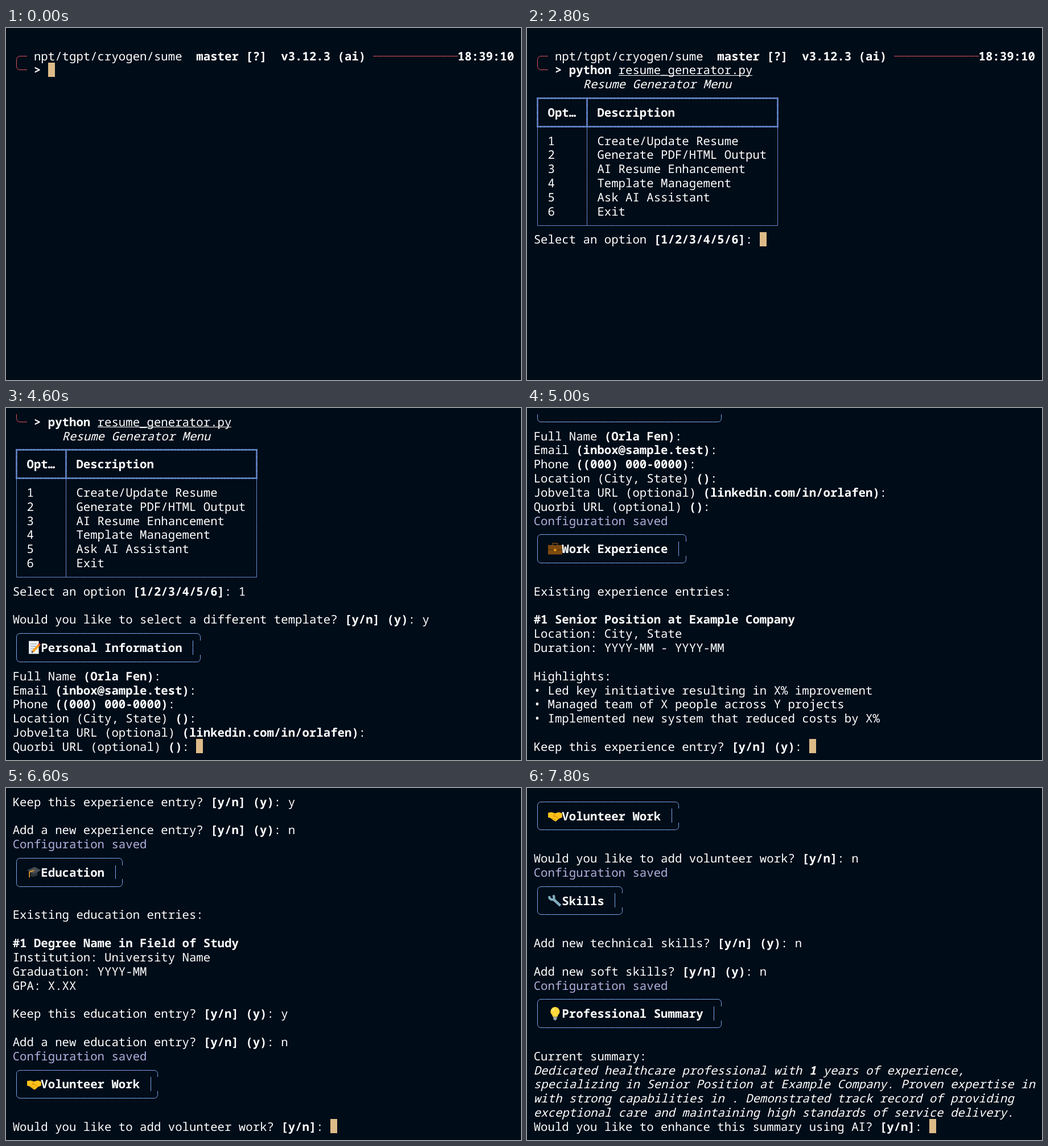
These frames come from a looping animation (905x619 px, 8 s). An HTML page with a canvas:

```html
<!DOCTYPE html>
<html lang="en">
<head>
<meta charset="utf-8">
<title>Resume Generator</title>
<style>
  html, body { margin: 0; width: 100%; height: 100%; overflow: hidden; background: #000c18; }
  canvas { display: block; }
</style>
</head>
<body>
<canvas id="screen" width="905" height="619"></canvas>
<script>
const ctx = document.getElementById('screen').getContext('2d');
const LEFT = 11.7, TOP = 11.4, CELL_W = 12.41, CELL_H = 24.83, ROWS = 24;
const STEP = 200, LOOP = 8000;
const BACK = '#000c18', INK = '#ffffff', CURSOR = '#ddbb88';
const RED = '#dd5560', TABLE = '#6688cc', PANEL = '#7aa6ee', SAVED = '#b0b0dd';

// Markup: * bold, ~ italic, | underline, $ cursor position (an answer may follow it).
// A leading ! means the program pauses on an empty line first.
const lines = [];
const add = (text, accent = INK, ink = INK) =>
  lines.push({ text: text.replace(/^!/, ''), pause: text[0] === '!', accent, ink });
const addAll = (block, accent) => block.split('\n').forEach(text => add(text, accent));
const saved = (mark = '') => add(mark + 'Configuration saved', INK, SAVED);
const panel = (icon, title) => {
  const bar = '─'.repeat(title.length + 5);
  addAll(`╭${bar}╮\n│ ${icon}*${title}* │\n╰${bar}╯`, PANEL);
};

addAll(`
╭─ npt/tgpt/cryogen/sume  *master [?]  v3.12.3 (ai)* ${'─'.repeat(12)}*18:39:10*
╰─ *> python* |resume_generator.py|`, RED);
add('!       ~Resume Generator Menu~');
const fill = (l, bar, m, r) => l + bar.repeat(6) + m + bar.repeat(26) + r;
const row = (bar, id, label, style = '') =>
  `${bar} ${style}${id.padEnd(4)}${style} ${bar} ${style}${label.padEnd(24)}${style} ${bar}`;
add(fill('┏', '━', '┳', '┓'), TABLE);
add(row('┃', 'Opt…', 'Description', '*'), TABLE);
add(fill('┡', '━', '╇', '┩'), TABLE);
['Create/Update Resume', 'Generate PDF/HTML Output', 'AI Resume Enhancement',
 'Template Management', 'Ask AI Assistant', 'Exit']
  .forEach((label, i) => add(row('│', String(i + 1), label), TABLE));
add(fill('└', '─', '┴', '┘'), TABLE);
addAll(`Select an option *[1/2/3/4/5/6]*: $1

Would you like to select a different template? *[y/n]* *(y)*: $y`);
panel('📝', 'Personal Information');
addAll(`Full Name *(Orla Fen)*: $
Email *(inbox@sample.test)*: $
Phone *((000) 000-0000)*: $
Location (City, State) *()*: $
Jobvelta URL (optional) *(linkedin.com/in/orlafen)*: $
Quorbi URL (optional) *()*: $`);
saved('!');
panel('💼', 'Work Experience');
addAll(`
Existing experience entries:

*#1 Senior Position at Example Company*
Location: City, State
Duration: YYYY-MM - YYYY-MM

Highlights:
• Led key initiative resulting in X% improvement
• Managed team of X people across Y projects
• Implemented new system that reduced costs by X%

Keep this experience entry? *[y/n]* *(y)*: $y

Add a new experience entry? *[y/n]* *(y)*: $n`);
saved();
panel('🎓', 'Education');
addAll(`
Existing education entries:

*#1 Degree Name in Field of Study*
Institution: University Name
Graduation: YYYY-MM
GPA: X.XX

Keep this education entry? *[y/n]* *(y)*: $y

Add a new education entry? *[y/n]* *(y)*: $n`);
saved();
panel('🤝', 'Volunteer Work');
addAll(`
Would you like to add volunteer work? *[y/n]*: $n`);
saved();
panel('🔧', 'Skills');
addAll(`
Add new technical skills? *[y/n]* *(y)*: $n

Add new soft skills? *[y/n]* *(y)*: $n`);
saved();
panel('💡', 'Professional Summary');
addAll(`
Current summary:
~Dedicated healthcare professional with *1* years of experience,~
~specializing in Senior Position at Example Company. Proven expertise in~
~with strong capabilities in . Demonstrated track record of providing~
~exceptional care and maintaining high standards of service delivery.~
Would you like to enhance this summary using AI? *[y/n]*: $`);

// One entry per step: the row holding the cursor and that row's text.
const COMMAND_ROW = 2;
const steps = [];
const push = (row, text) => steps.push({ row, text });
const type = text => push(COMMAND_ROW, '╰─ *> ' + text);
type('*$');
for (let n = 1; n <= 6; n++) type(`${'python'.slice(0, n)}*$${'python demo.py'.slice(n)}`);
type('python* $demo.py');
const script = 'resume_generator.py';
for (let n = 1; n <= 4; n++) type(`python* |${script.slice(0, n)}|$${script.slice(n)}`);
type(`python* |${script}|$`);
lines.forEach(({ text, pause }, i) => {
  if (pause) push(i, '$');
  const [prompt, answer] = text.split('$');
  if (answer === undefined) return;
  push(i, prompt + '$');
  if (answer) push(i, prompt + answer + '$');
});

// Stroke weights: up, right, down, left (1 light, 2 heavy).
const strokes = {
  '─': '0101', '│': '1010', '━': '0202', '┃': '2020', '┏': '0220', '┳': '0222', '┓': '0022',
  '┡': '2210', '╇': '2212', '┩': '2012', '└': '1100', '┴': '1101', '┘': '1001'
};
const corners = { '╭': [1, 1], '╮': [-1, 1], '╰': [1, -1], '╯': [-1, -1] };

// Icon layers on a 24 unit square: colour, path, stroke width (filled when absent).
const icons = {
  '📝': [['#f2f5f7', 'M3 1H20V23H3Z'], ['#99aabb', 'M6 6H16M6 10H15M6 14H12M6 18H10', 1.3],
         ['#f7a51d', 'M10 19L20 8', 4], ['#e0453a', 'M20 8L22 6', 4], ['#333333', 'M8 21L10 19', 2]],
  '💼': [['#5d3a12', 'M8 6V3H16V6', 2], ['#7d4a10', 'M0 6H24V22H0Z'],
         ['#4e2c08', 'M0 13Q12 17 24 13', 1.2], ['#f2b01e', 'M10 13H14V16H10Z']],
  '🎓': [['#2f3337', 'M6 12V19Q12 22 18 17V11Z'], ['#484e53', 'M0 9L13 3L24 9L11 15Z'],
         ['#f5a623', 'M12 9L4 12V21', 1.6]],
  '🤝': [['#fcc21b', 'M0 7L6 6L12 8L18 6L24 8V15L19 17L13 22L9 20L4 16L0 15Z'],
         ['#d98f0c', 'M12 9L9 13H13L18 17M7 18L9 16M10 20L12 17', 1.2]],
  '🔧': [['#82aec0', 'M8 9L21 21', 4.5], ['#82aec0', 'M2 5Q2 11 8 11Q12 9 9 3', 4]],
  '💡': [['#ffd83b', 'M12 1A8 8 0 0 1 17 15L16 18H8L7 15A8 8 0 0 1 12 1Z'],
         ['#9aa7ad', 'M9 18H15V22L13 24H11L9 22Z'], ['#fff3b0', 'M8 8Q9 5 11 4', 1.5]]
};

function drawIcon(layers, x, y) {
  ctx.save();
  ctx.translate(x + 0.5, y);
  ctx.scale(1.03, 1.03);
  for (const [color, path, width] of layers) {
    ctx.fillStyle = ctx.strokeStyle = color;
    ctx.lineWidth = width || 1;
    ctx[width ? 'stroke' : 'fill'](new Path2D(path));
  }
  ctx.restore();
}

function drawBox(ch, x, y, color) {
  const x0 = Math.round(x), x1 = Math.round(x + CELL_W);
  const y0 = Math.round(y), y1 = Math.round(y + CELL_H);
  const cx = Math.floor(x + CELL_W / 2 + 0.5) + 0.5, cy = Math.floor(y + 12.9) + 0.5;
  ctx.strokeStyle = color;
  if (corners[ch]) {
    const [dx, dy] = corners[ch], endX = dx > 0 ? x1 : x0;
    ctx.lineWidth = 1;
    ctx.beginPath();
    ctx.moveTo(cx, dy > 0 ? y1 : y0);
    ctx.arcTo(cx, cy, endX, cy, 6);
    ctx.lineTo(endX, cy);
    ctx.stroke();
    return;
  }
  const ends = [[cx, y0], [x1, cy], [cx, y1], [x0, cy]];
  [...strokes[ch]].forEach((weight, i) => {
    if (weight === '0') return;
    ctx.lineWidth = weight === '2' ? 2.5 : 1;
    ctx.lineCap = weight === '2' ? 'square' : 'butt';
    ctx.beginPath();
    ctx.moveTo(cx, cy);
    ctx.lineTo(...ends[i]);
    ctx.stroke();
  });
  ctx.lineCap = 'butt';
}

function drawLine(text, rowIndex, { accent, ink }, hasCursor) {
  const style = { '*': false, '~': false, '|': false };
  const y = TOP + rowIndex * CELL_H;
  let col = 0, underCursor = false;
  for (const ch of text) {
    const x = LEFT + col * CELL_W;
    if (ch in style) { style[ch] = !style[ch]; continue; }
    if (ch === '$') {
      if (hasCursor) {
        ctx.fillStyle = CURSOR;
        ctx.fillRect(Math.round(x), Math.round(y), 12, 25);
        underCursor = true;
      }
      continue;
    }
    if (icons[ch]) {
      drawIcon(icons[ch], x, y);
      col++;
    } else if (strokes[ch] || corners[ch]) {
      drawBox(ch, x, y, accent);
    } else {
      ctx.fillStyle = underCursor ? BACK : ink;
      ctx.font = `${style['~'] ? 'italic ' : ''}${style['*'] ? 700 : 300} 20.68px "Noto Sans Mono", monospace`;
      ctx.fillText(ch, x, Math.round(y + 20.4));
      if (style['|']) ctx.fillRect(Math.round(x), Math.round(y + 22), Math.round(x + CELL_W) - Math.round(x), 1);
    }
    underCursor = false;
    col++;
  }
}

function draw() {
  const index = Math.floor(performance.now() % LOOP / STEP);
  const { row: last, text } = steps[Math.min(index, steps.length - 1)];
  const first = Math.max(0, last - ROWS + 1);
  ctx.fillStyle = BACK;
  ctx.fillRect(0, 0, 905, 619);
  ctx.textRendering = 'geometricPrecision';
  for (let i = first; i < last; i++) drawLine(lines[i].text, i - first, lines[i], false);
  drawLine(text, last - first, lines[last], true);
  requestAnimationFrame(draw);
}
draw();
</script>
</body>
</html>
```
